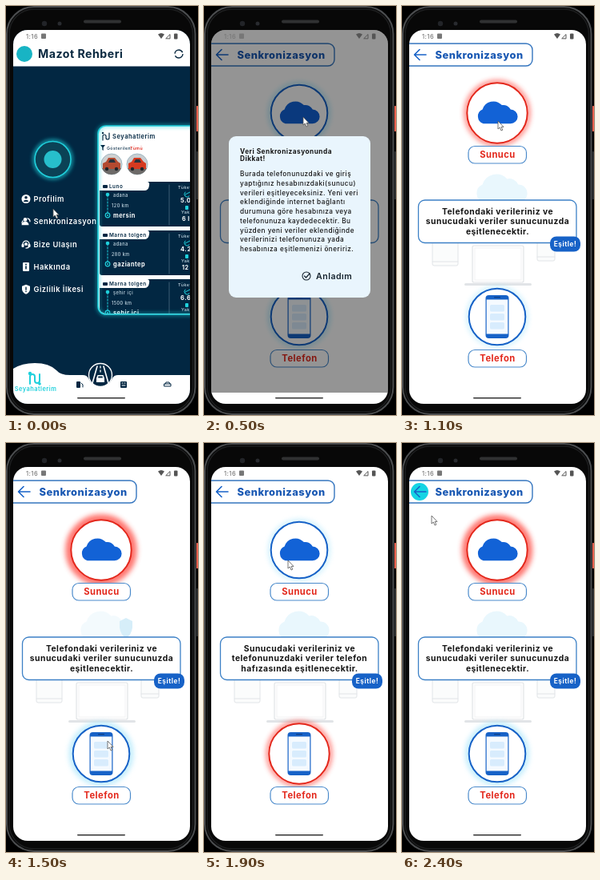
Recreate the animation shown at these times as an HTML page. Size 240 by 512 pixels, loop 2500 ms.

```html
<!DOCTYPE html>
<html lang="tr">
<head>
<meta charset="utf-8">
<title>Senkronizasyon</title>
<style>
html, body { margin: 0; width: 240px; height: 512px; overflow: hidden; background: #000; }
svg { display: block; font-family: Inter, "Open Sans", sans-serif; letter-spacing: .03em; }
</style>
</head>
<body>
<svg id="stage" width="240" height="512" viewBox="0 0 240 512"></svg>
<script>
const LOOP = 2500, STEP = 100;
const BLUE = '#1762c7', NAVY = '#022742', CYAN = '#1fd0dc', RED = '#e3281c';
const CLOUD = 'M-15 12a8.5 8.5 0 0 1-1-16a13 13 0 0 1 22-5a9 9 0 0 1 10 5a8 8 0 0 1 0 16z';

const text = (x, y, size, str, fill, weight = 700, anchor = 'start') =>
  `<text x="${x}" y="${y}" font-size="${size}" font-weight="${weight}" fill="${fill}" text-anchor="${anchor}">${str}</text>`;
const rect = (x, y, w, h, r, fill, extra = '') =>
  `<rect x="${x}" y="${y}" width="${w}" height="${h}" rx="${r}" fill="${fill}" ${extra}/>`;
const circle = (x, y, r, fill, extra = '') =>
  `<circle cx="${x}" cy="${y}" r="${r}" fill="${fill}" ${extra}/>`;
const line = (d, stroke, w = 1, extra = '') =>
  `<path d="${d}" fill="none" stroke="${stroke}" stroke-width="${w}" stroke-linecap="round" stroke-linejoin="round" ${extra}/>`;
const shape = (d, fill, extra = '') => `<path d="${d}" fill="${fill}" ${extra}/>`;
const group = (id, body, extra = '') => `<g id="${id}" ${extra}>${body}</g>`;

// Menu page
function menuItems() {
  const icons = [
    circle(0, 0, 5.5, '#fff') + circle(0, -1.7, 1.8, NAVY) + shape('M-3.3 3.4a3.4 2.8 0 0 1 6.6 0z', NAVY),
    circle(-1, -2.4, 2.3, '#fff') + shape('M-5.5 4.5a4.5 4.5 0 0 1 9 0z', '#fff') + line('M2-4a4 4 0 0 1 3 4M-4-1a5 5 0 0 0-1 3', '#fff', 1.2),
    line('M-4 1v-1a4 4 0 0 1 8 0v1M4 3q-1 2-4 2', '#fff', 1.3) + rect(-5.5, 0, 3, 4, 1, '#fff') + rect(2.5, 0, 3, 4, 1, '#fff') + circle(0, 0, 2, '#fff'),
    rect(-4, -5.5, 8, 11, 1.2, '#fff') + rect(-.8, -1, 1.6, 4, 0, NAVY) + circle(0, -3, 1, NAVY),
    shape('M0-6L5-4V0Q4.5 4 0 6Q-4.5 4-5 0V-4z', '#fff') + rect(-.7, -3, 1.4, 4, 0, NAVY) + circle(0, 2.7, .8, NAVY)
  ];
  return ['Profilim', 'Senkronizasyon', 'Bize Ulaşın', 'Hakkında', 'Gizlilik İlkesi'].map((label, i) => {
    const y = 241.5 + i * 28.3;
    return `<g transform="translate(25 ${y})">${icons[i]}</g>` + text(34.5, y + 3.5, 9.3, label, '#fff', 600);
  }).join('');
}

function trip(y, car, from, km, to, rate, cost) {
  return rect(117, y, 120, 56, 3, NAVY) +
    shape(`M117 ${y}H176q4 0 3 5q-1 6-6 6H117z`, '#fff') +
    rect(121, y + 4, 6, 4, 1, NAVY) + text(129, y + 8, 6.4, car, NAVY, 600) +
    line(`M127 ${y + 17}v24`, CYAN, 1, 'stroke-dasharray="2 2"') +
    circle(127, y + 16, 2.3, CYAN) + circle(127, y + 42, 2.8, 'none', `stroke="${CYAN}" stroke-width="1.2"`) + circle(127, y + 42, 1, CYAN) +
    text(134, y + 19, 5.6, from, '#c9dbe6', 500) + text(132, y + 31.5, 5.5, km, '#c9dbe6', 500) +
    text(134, y + 45, 7.4, to, '#fff') + line(`M204 ${y + 4}v50`, '#56768b', .7) +
    text(215, y + 9, 5.4, 'Tüketim', '#c9dbe6', 500) + line(`M224 ${y + 16}l6-3M224 ${y + 13}a3.5 3.5 0 1 0 5 5`, CYAN, 1) +
    text(218, y + 25.5, 7.6, rate, '#fff') + rect(224, y + 30, 4, 5, 1, CYAN) +
    text(219, y + 40, 5.4, 'Yakıt', '#c9dbe6', 500) + text(220, y + 49, 7.2, cost, '#fff');
}

const carPhoto = (x, sky, body) =>
  circle(x, 198, 13, sky, 'stroke="#9fb9c4" stroke-width="1"') +
  shape(`M${x - 12} 203a13 13 0 0 0 24 0z`, '#6d6a68') +
  shape(`M${x - 11} 204v-7l4-2 3-5h8l4 5 3 2v7z`, body) +
  shape(`M${x - 4} 196l2-4h5l2 4z`, '#28313a') +
  circle(x - 6, 204, 2.2, '#20252a') + circle(x + 6, 204, 2.2, '#20252a');

function menuPage() {
  const rows = trip(220, 'Luno', 'adana', '120 km', 'mersin', '5.0', '6 lt') +
    trip(281, 'Marna tolgen', 'adana', '280 km', 'gaziantep', '4.2', '12 lt') +
    trip(342, 'Marna tolgen', 'şehir içi', '1500 km', 'şehir içi', '6.6', '99 lt');
  const card = rect(115, 150, 140, 236, 10, '#fff') +
    line('M121 168v-5a2 2 0 0 1 4 0v2a2 2 0 0 0 4 0v-6', NAVY, 1.2) + circle(121, 159, 1.2, NAVY) +
    text(133, 166, 7.6, 'Seyahatlerim', NAVY, 600) +
    shape('M118 174h6l-2.3 3v4l-1.4-1v-3z', NAVY) +
    text(126, 180, 5.2, 'Gösterilen:', NAVY, 500) + text(155, 180, 5.2, 'Tümü', RED, 600) +
    carPhoto(132, '#cfd0d0', '#b34a30') + carPhoto(164, '#c9cdd0', '#d63a20') +
    `<g clip-path="url(#cardClip)">${rows}</g>`;
  const border = rect(115, 150, 140, 236, 10, 'none', `stroke="${CYAN}" stroke-width="3" opacity=".7" filter="url(#soft)"`) +
    rect(115, 150, 140, 236, 10, 'none', `stroke="${CYAN}" stroke-width="1.6"`);
  const bar = shape('M9 454Q20 447 36 447Q54 447 63 456Q68 462 80 462H96Q101 462 103 466A16 16 0 0 0 133 466Q135 462 140 462H231V500H9z', '#fff') +
    line('M30 473v-9a3 3 0 0 1 6 0v5a3 3 0 0 0 6 0v-8', CYAN, 2) + circle(30, 460, 2.2, CYAN) + circle(42, 473, 1.8, CYAN) +
    text(37, 482, 7.4, 'Seyahatlerim', CYAN, 600, 'middle') +
    circle(118, 462, 14.5, NAVY, 'stroke="#fff" stroke-width="1.3"') +
    line('M114 451L108 472M122 451L128 472', '#fff', 1.6) + line('M118 451v7', '#fff', 1.3, 'stroke-dasharray="2 3"') +
    shape('M113 471v-5l1.500-4h7l1.500 4v5z', '#fff') + rect(115.2, 463.5, 5.6, 2, .5, NAVY) +
    rect(88, 470, 5, 8, 1, NAVY) + line('M94 472l2 2v3', NAVY, 1) +
    rect(143, 470, 8, 8, 1, NAVY) + line('M145 472h1M148 472h1M145 475h4', '#fff', 1) +
    line('M199 473l1-2h4l1 2M198 473h8v3h-8z', NAVY, 1);
  return rect(9, 30, 222, 470, 0, NAVY) + rect(9, 30, 222, 45.5, 0, '#fff') +
    circle(23, 60, 10, '#18b4c4') + text(40, 65, 14.2, 'Mazot Rehberi', '#0a2940') +
    circle(216, 60, 5, 'none', 'stroke="#0a2940" stroke-width="1.4" stroke-dasharray="13 2.7"') +
    circle(58.5, 192, 23, 'none', `stroke="${CYAN}" stroke-width="4" opacity=".8" filter="url(#soft)"`) +
    circle(58.5, 192, 22.5, '#0b4256', `stroke="${CYAN}" stroke-width="1.6"`) + circle(58.5, 192, 11, '#27bfcb') +
    menuItems() + card + border + bar;
}

// Sync page
const target = (id, y, icon, label) =>
  circle(119, y, 36, 'none', `id="${id}Glow" filter="url(#glow)"`) +
  circle(119, y, 35.3, '#fff', `id="${id}Ring" stroke-width="2"`) +
  `<g transform="translate(119 ${y})">${icon}</g>` +
  rect(83, y + 41.5, 72.5, 21.5, 8, '#fff', 'stroke="#4a8acb" stroke-width="1.2"') +
  text(119.5, y + 56, 11.2, label, RED, 700, 'middle');

const phoneIcon = rect(-14.5, -27, 29, 54, 4, BLUE) + rect(-13.3, -21.5, 26.6, 43, 0, '#f5faff') +
  [-15, -4, 7].map(y => rect(-9, y, 18, 8.5, 1.5, '#d8ecfd')).join('') + rect(-4, -25, 8, 1.3, .6, '#0c3c85');

function backdrop() {
  const gray = '#e1e4e7';
  const tablet = (x, y, w, h) => rect(x, y, w, h, 2, '#fbfcfc', `stroke="${gray}" stroke-width="1"`) +
    line(`M${x} ${y + h - 5}h${w}`, gray, 1);
  return group('air', `<path d="${CLOUD}" fill="#e9f7fd" transform="translate(123 229) scale(1.4)"/>`) +
    group('shield', shape('M150 219l8 4v8q-1 9-8 13q-7-4-8-13v-8z', '#d6eef9')) +
    tablet(38, 285, 32, 40) + tablet(169, 285, 22, 34) +
    rect(88, 300, 64, 46, 2, '#fdfdfd', `stroke="${gray}" stroke-width="1.2"`) +
    rect(91, 303, 58, 40, 0, '#fff', `stroke="#eff1f3" stroke-width=".8"`) + rect(78, 347, 84, 3, 1.5, gray);
}

const lines = (list, x, y, gap, size, weight, anchor) =>
  list.map((s, i) => text(x, y + i * gap, size, s, '#151515', weight, anchor)).join('');

function syncPage() {
  const cloudIcon = shape(CLOUD, '#1262d6', 'transform="translate(-.8 0) scale(1.1)"');
  return rect(9, 30, 222, 454, 0, '#fff') + backdrop() +
    shape('M7 47H155a8 8 0 0 1 8 8V67a8 8 0 0 1-8 8H7z', '#fff', 'stroke="#3475bf" stroke-width="1.4"') +
    circle(22, 61, 11, '#14d4e4', 'id="ripple"') +
    line('M30 61H16M22 54.5L15.5 61L22 67.5', BLUE, 1.6) +
    text(41.5, 66, 12.9, 'Senkronizasyon', '#1958b3', 800) +
    target('server', 134, cloudIcon, 'Sunucu') +
    target('phone', 389, phoneIcon, 'Telefon') +
    rect(20.5, 243, 197.5, 53.5, 8, '#fff', 'stroke="#3c80c6" stroke-width="1.3"') +
    group('askText', lines(['Veri eşitleme konumu seçin!'], 119, 273, 12, 10.35, 700, 'middle')) +
    group('serverText', lines(['Telefondaki verileriniz ve', 'sunucudaki veriler sunucunuzda', 'eşitlenecektir.'], 119.5, 261, 12.4, 10.35, 700, 'middle')) +
    group('phoneText', lines(['Sunucudaki verileriniz ve', 'telefonunuzdaki veriler telefon', 'hafızasında eşitlenecektir.'], 119.5, 261, 12.4, 10.35, 700, 'middle')) +
    group('action', rect(185, 288.5, 38, 19, 8, BLUE) + text(204, 301, 8.3, 'Eşitle!', '#fff', 700, 'middle'));
}

function dialog() {
  return rect(9, 30, 222, 454, 0, '#000', 'opacity=".42"') + rect(31, 163, 177, 202, 9, '#e9f5fd') +
    lines(['Veri Senkronizasyonunda', 'Dikkat!'], 45, 185, 9, 8.3, 700) +
    lines(['Burada telefonunuzdaki ve giriş', 'yaptığınız hesabınızdaki(sunucu)', 'verileri eşitleyeceksiniz. Yeni veri',
      'eklendiğinde internet bağlantı', 'durumuna göre hesabınıza veya', 'telefonunuza kaydedecektir. Bu',
      'yüzden yeni veriler eklendiğinde', 'verilerinizi telefonunuza yada', 'hesabınıza eşitlemenizi öneririz.'], 45, 213, 11.75, 8.25, 500) +
    circle(128, 338, 5, 'none', 'stroke="#16232e" stroke-width="1.1"') + line('M125.5 338l2 2l4.5-5', '#16232e', 1.2) +
    text(140, 341.5, 10.6, 'Anladım', '#16232e', 600);
}

const status = text(25, 40.5, 7.5, '1:16', '#777', 500) + rect(44, 34.5, 6, 6.5, 1, '#777') +
  shape('M190 35.5q4-3 8 0l-4 5.5z', '#555') + line('M200 40.5l5-5v5z', '#555', 1) + rect(210, 34.5, 4.5, 7, 1, '#555');

const frame = rect(1, 1, 235.5, 510, 34, '#080808', 'stroke="#4b4d4f" stroke-width="2"') +
  rect(4, 4, 229.5, 504, 31, 'none', 'stroke="#1d1e1f" stroke-width="1.5"') +
  rect(238, 125, 2, 32, .5, '#e8604e') + rect(238, 182, 2, 60, .5, '#2b2c2d') +
  rect(97, 17.5, 47, 4, 2, '#303132') + circle(48, 22, 3.2, '#222428') + circle(67, 22, 2.5, '#292b2f');

const $ = id => document.getElementById(id);
$('stage').innerHTML = `<defs>
  <filter id="soft" x="-30%" y="-30%" width="160%" height="160%"><feGaussianBlur stdDeviation="2.5"/></filter>
  <filter id="glow" x="-40%" y="-40%" width="180%" height="180%"><feGaussianBlur stdDeviation="3"/></filter>
  <clipPath id="screen">${rect(9, 30, 221, 468, 18, '#fff')}</clipPath>
  <clipPath id="cardClip">${rect(116, 151, 140, 234, 9, '#fff')}</clipPath></defs>` +
  frame + `<g clip-path="url(#screen)">` + group('menu', menuPage()) +
  rect(9, 30, 222, 454, 0, '#000', 'id="shade"') + group('sync', syncPage()) +
  group('dialog', dialog()) + rect(9, 484, 222, 16, 0, '#fff', 'id="navBar"') +
  status + rect(89, 490, 60, 1.6, .8, '#333') + '</g>' +
  shape('M0 0V10l2.3-2 1.7 4 1.8-.8-1.7-3.8H7z', '#fff', 'id="cursor" stroke="#555" stroke-width=".8"');

// Pointer stops: step, x, y
const PATH = [[0, 59, 254], [2, 61, 268], [3, 61, 268], [5, 124, 139], [6, 150, 333], [7, 134, 279], [9, 120, 142],
  [12, 120, 145], [15, 127, 373], [17, 122, 380], [19, 105, 147], [21, 108, 142], [23, 24, 62], [24, 37, 91]];

function pointer(n) {
  const i = Math.max(1, PATH.findIndex(p => p[0] >= n));
  const [a, x, y] = PATH[i - 1], [b, x2, y2] = PATH[i];
  const k = (n - a) / (b - a);
  return [x + (x2 - x) * k, y + (y2 - y) * k];
}

function set(id, attrs) {
  for (const key in attrs) $(id).setAttribute(key, attrs[key]);
}
const fade = (id, opacity) => set(id, { opacity });

function paintRing(id, active, pulse) {
  const r = active ? 37.7 : 35.3;
  set(id + 'Ring', { r, stroke: active ? RED : BLUE });
  set(id + 'Glow', {
    r: r + 1,
    stroke: active ? '#ff3a30' : '#b4e9fb',
    'stroke-width': active ? 5 + 7 * pulse : 4 + 4 * pulse,
    opacity: active ? .7 : .85
  });
}

function draw(n) {
  const scale = n < 2 ? 0 : n === 2 ? .9 : n === 3 ? .98 : 1;
  const chosen = n < 10 ? 'ask' : n < 16 || n >= 20 ? 'server' : 'phone';
  const pulse = .5 + .5 * Math.cos((n - 7) / 8 * 2 * Math.PI);
  const shield = Math.max(0, 1 - Math.abs(n - 15) / 4);

  fade('menu', n < 4 ? 1 : 0);
  fade('shade', n === 2 ? .25 : n === 3 ? .4 : 0);
  fade('navBar', n < 2 ? 0 : 1);
  fade('sync', n < 2 ? 0 : n === 2 ? .65 : 1);
  set('sync', { transform: `translate(120 257) scale(${scale}) translate(-120 -257)` });
  fade('dialog', n === 4 ? .5 : n === 5 || n === 6 ? 1 : 0);

  for (const id of ['ask', 'server', 'phone']) fade(id + 'Text', id === chosen ? 1 : 0);
  fade('action', chosen === 'ask' ? 0 : 1);
  paintRing('server', chosen === 'server', pulse);
  paintRing('phone', chosen === 'phone', pulse);
  fade('air', n < 5 ? 0 : 1 - shield * .5);
  fade('shield', shield);
  fade('ripple', n < 23 ? 0 : 1);
  set('ripple', { r: n === 23 ? 7 : 11 });
  set('cursor', { transform: `translate(${pointer(n)})` });
}

let last = -1;
function tick() {
  const n = Math.floor(performance.now() % LOOP / STEP);
  if (n !== last) draw(last = n);
  requestAnimationFrame(tick);
}
tick();
</script>
</body>
</html>
```
